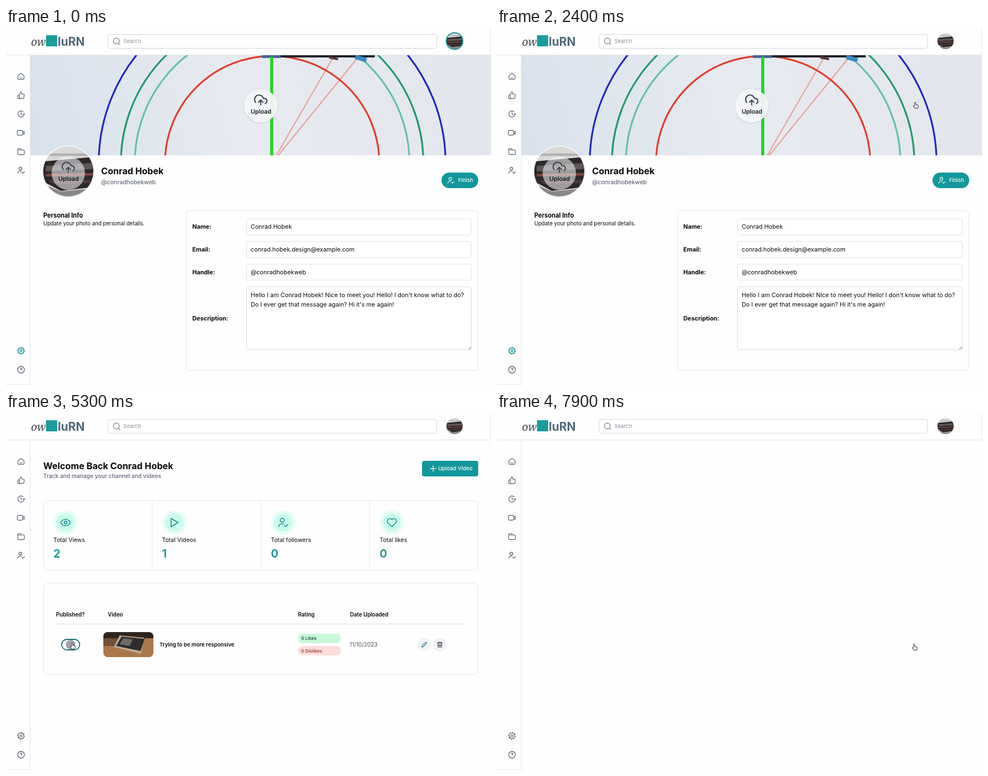
Animation, 872 px wide and 642 px high, one loop 8000 ms. Source, as an HTML page with a canvas:

```html
<!DOCTYPE html>
<html lang="en">
<head>
<meta charset="utf-8">
<title>Channel settings</title>
<style>
html, body { margin: 0; width: 100%; height: 100%; overflow: hidden; background: #fefefe; }
canvas { display: block; width: 872px; height: 642px; }
</style>
</head>
<body>
<canvas id="stage" width="872" height="642"></canvas>
<script>
const ctx = document.getElementById('stage').getContext('2d');
const LOOP = 8000;
const TEAL = '#12979a', INK = '#08090b', GREY = '#4b5563', LINE = '#e4e6ea';
const NAME = 'Conrad Hobek', HANDLE = '@conradhobekweb';

function gearPath() {
  let d = '';
  for (let i = 0; i < 32; i++) {
    const r = i % 4 < 2 ? 10.5 : 8, a = (i + .5) * Math.PI / 16;
    d += (i ? 'L' : 'M') + (12 + r * Math.cos(a)) + ' ' + (12 + r * Math.sin(a));
  }
  return d + 'ZM15 12a3 3 0 1 1-6 0 3 3 0 0 1 6 0Z';
}

// Icons live in a 24 x 24 box.
const ICONS = {
  home: 'M3 10.5 10 4a3 3 0 0 1 4 0l7 6.5V18a3 3 0 0 1-3 3H6a3 3 0 0 1-3-3ZM8 17h8',
  like: 'M14 9V5a3 3 0 0 0-3-3l-4 9v11h11.3a2 2 0 0 0 2-1.7l1.4-9a2 2 0 0 0-2-2.3ZM7 22H4a2 2 0 0 1-2-2v-7a2 2 0 0 1 2-2h3',
  clock: 'M23 13l-2-2-2 2M21 12a9.2 9.2 0 1 1-2.7-6.4M12 7v5l3.5 2',
  video: 'M22 8.5c0-.9-.9-1.3-1.6-.7L17 11v2l3.4 3.2c.7.6 1.6.2 1.6-.7ZM4 5h10a3 3 0 0 1 3 3v8a3 3 0 0 1-3 3H4a3 3 0 0 1-3-3V8a3 3 0 0 1 3-3Z',
  folder: 'M13 7l-1.1-2.2A3 3 0 0 0 9.2 3H5a3 3 0 0 0-3 3v1h17a3 3 0 0 1 3 3v7a4 4 0 0 1-4 4H6a4 4 0 0 1-4-4V7',
  follow: 'M14.5 7a4.3 4.3 0 1 1-8.6 0 4.3 4.3 0 0 1 8.6 0ZM13 15H8a5.5 5.5 0 0 0-5.5 6M14.5 18l2.7 2.7L22.5 16',
  gear: gearPath(),
  help: 'M22 12a10 10 0 1 1-20 0 10 10 0 0 1 20 0ZM9.1 9a3 3 0 0 1 5.8 1c0 2-3 3-3 3M12 17h.01',
  search: 'M20 11a9 9 0 1 1-18 0 9 9 0 0 1 18 0ZM17.5 17.5l4.5 4.5',
  upload: 'M16 16l-4-4-4 4M12 12v9M20.4 18.4A5 5 0 0 0 18 9h-1.3A8 8 0 1 0 3 16.3',
  user: 'M16.5 7.5a4.5 4.5 0 1 1-9 0 4.5 4.5 0 0 1 9 0ZM4 22c0-5 3-7 8-7s8 2 8 7',
  brush: 'M9 12 18.5 2.8a1.8 1.8 0 0 1 2.7 2.7L12 15M9 12a5 5 0 0 0-5 5c0 2-1 3-2 4 5 1 10 0 10-6Z',
  chat: 'M3 6a3 3 0 0 1 3-3h12a3 3 0 0 1 3 3v9a3 3 0 0 1-3 3h-3l-4 4v-4H6a3 3 0 0 1-3-3ZM12 7v7M8.5 10.5h7',
  file: 'M14 2H7a3 3 0 0 0-3 3v14a3 3 0 0 0 3 3h10a3 3 0 0 0 3-3V8ZM14 2v6h6M8 13h8M8 17h6',
  lock: 'M17 10V8A5 5 0 0 0 7 8v2M6 10h12a2 2 0 0 1 2 2v7a2 2 0 0 1-2 2H6a2 2 0 0 1-2-2v-7a2 2 0 0 1 2-2ZM12 14v3',
  exit: 'M9 3H6a3 3 0 0 0-3 3v12a3 3 0 0 0 3 3h3M16 8l5 4-5 4M21 12H9',
  eye: 'M1.5 12C4 7 8 5 12 5s8 2 10.5 7C20 17 16 19 12 19S4 17 1.5 12ZM15 12a3 3 0 1 1-6 0 3 3 0 0 1 6 0Z',
  play: 'M5 3l15 9-15 9Z',
  heart: 'M12 21 3.5 12.5a5.5 5.5 0 0 1 8-7.5l.5.6.5-.6a5.5 5.5 0 0 1 8 7.5Z',
  pencil: 'M3 21l1-5L16.5 3.5a2.5 2.5 0 0 1 4 4L8 20Z',
  trash: 'M3 6h18M8 6V3h8v3M5 6l1 15h12l1-15M10 11v6M14 11v6',
  plus: 'M12 2v20M2 12h20'
};
for (const k in ICONS) ICONS[k] = new Path2D(ICONS[k]);
const HAND = new Path2D('M5 9V2.5a1.5 1.5 0 0 1 3 0V7l4.5 1A2 2 0 0 1 14 10v2l-1.5 4h-6L2.5 11.5c-.8-1 .5-2.5 1.7-1.5Z');
const ARROW = new Path2D('M0 0V10.5L2.6 8.2 4.4 12 6.2 11.2 4.5 7.5H8Z');

function icon(name, x, y, size, color, weight = 1.1) {
  const k = size / 24;
  ctx.save();
  ctx.translate(x - size / 2, y - size / 2);
  ctx.scale(k, k);
  ctx.strokeStyle = color;
  ctx.lineWidth = weight / k;
  ctx.lineCap = ctx.lineJoin = 'round';
  ctx.stroke(ICONS[name]);
  ctx.restore();
}

// Text placed by the middle of its capitals.
function text(s, x, mid, size, weight = 400, color = INK, family = 'Inter, sans-serif') {
  ctx.font = `${weight} ${size}px ${family}`;
  ctx.fillStyle = color;
  ctx.fillText(s, x, mid + size * .364);
}

function box(x, y, w, h, r, fill, stroke, weight = 1) {
  ctx.beginPath();
  ctx.roundRect(x, y, w, h, r);
  if (fill) { ctx.fillStyle = fill; ctx.fill(); }
  if (stroke) { ctx.strokeStyle = stroke; ctx.lineWidth = weight; ctx.stroke(); }
}

function disc(x, y, r, fill, stroke, weight = 1) {
  box(x - r, y - r, 2 * r, 2 * r, r, fill, stroke, weight);
}

function line(x1, y1, x2, y2, color = LINE, weight = 1) {
  ctx.beginPath();
  ctx.moveTo(x1, y1);
  ctx.lineTo(x2, y2);
  ctx.strokeStyle = color;
  ctx.lineWidth = weight;
  ctx.stroke();
}

function rect(x, y, w, h, color) {
  ctx.fillStyle = color;
  ctx.fillRect(x, y, w, h);
}

function poly(color, ...p) {
  ctx.beginPath();
  for (let i = 0; i < p.length; i += 2) ctx.lineTo(p[i], p[i + 1]);
  ctx.closePath();
  ctx.fillStyle = color;
  ctx.fill();
}

function shadow(color, blur, dy, draw) {
  ctx.save();
  ctx.shadowColor = color;
  ctx.shadowBlur = blur;
  ctx.shadowOffsetY = dy;
  draw();
  ctx.restore();
}

function portrait(x, y, r) {
  ctx.save();
  disc(x, y, r, '#d9d8d8');
  ctx.clip();
  ctx.translate(x, y);
  ctx.scale(r, r);
  rect(-1, -.72, 2, .1, '#b5b1b0');
  poly('#2c282a', -1, -.4, 1, -.58, 1, .62, -.3, .78, -1, .4);
  poly('#5f5756', -.9, -.22, 1, -.34, 1, -.1, -.9, 0);
  poly('#85453f', -.9, .1, 1, .06, 1, .16, -.9, .2);
  poly('#4e3a39', -.8, .36, 1, .34, 1, .46, -.6, .5);
  poly('#8b8788', -1, .5, -.3, .8, 1, .68, 1, 1, -1, 1);
  ctx.restore();
}

function frame(settings, ring) {
  line(0, 48.5, 872, 48.5);
  line(43.5, 49, 43.5, 642);
  line(0, 641.5, 43, 641.5);
  line(871.5, 0, 871.5, 48);
  text('ow', 45, 25, 19, 'italic 400', '#3f4649', '"Noto Serif", serif');
  rect(72, 13, 20, 20, '#1b9c9f');
  text('luRN', 93, 24, 21, 700, '#50697a');
  box(183.5, 11.5, 591, 25, 4, '#fff', '#d3d6db');
  icon('search', 199, 24, 14, '#6b7280');
  text('Search', 211, 24, 9.6, 400, '#8b919b');
  portrait(806.5, 23.5, 14.5);
  if (ring) disc(806.5, 23.5, 15, null, '#169c9c', 1.8);
  ['home', 'like', 'clock', 'video', 'folder', 'follow'].forEach((n, i) =>
    icon(n, 27, 87 + i * 33.8, 14.5, GREY));
  icon('gear', 27, 580.5, 14, settings ? TEAL : GREY, settings ? 1.4 : 1.1);
  icon('help', 27, 614.5, 14.5, GREY, 1.2);
}

function banner() {
  ctx.save();
  ctx.beginPath();
  ctx.rect(44, 49, 828, 180);
  ctx.clip();
  const g = ctx.createLinearGradient(44, 229, 872, 49);
  g.addColorStop(0, '#d9e2ec');
  g.addColorStop(.45, '#e7eaf0');
  g.addColorStop(1, '#e3e7ed');
  rect(44, 49, 828, 180, g);
  line(486, 229, 588, 53, '#e7a19b', 2.2);
  line(489.5, 229, 632, 54, '#e7a19b', 2.2);
  for (const [r, c] of [[311.8, '#2127c2'], [272, '#229b6d'], [247, '#62c2a6'], [192.7, '#e23d2a']]) {
    ctx.beginPath();
    ctx.arc(478.5, 243, r, Math.PI, 2 * Math.PI);
    ctx.strokeStyle = c;
    ctx.lineWidth = 3.2;
    ctx.stroke();
  }
  rect(490, 49, 173, 4, '#20222a');
  rect(460, 49, 34, 5, '#46679d');
  rect(475, 52, 5.5, 177, '#20d61f');
  line(581, 53, 597, 56, '#5b3436', 4);
  line(628, 52, 648, 58, '#358cbf', 8);
  ctx.restore();
}

function uploadDisc(x, y, fill) {
  disc(x, y, 30, fill);
  icon('upload', x, y - 10.5, 24, '#374151', 1.8);
  text('Upload', x - 18, y + 10.5, 10.8, 500);
}

function field(label, value, y) {
  text(label, 335, y, 10.8, 700);
  box(432.5, y - 14.5, 404, 29, 3, '#fff', '#dcdfe3');
  text(value, 440, y, 10.8);
}

function settingsPage() {
  banner();
  shadow('rgba(60,70,80,.18)', 3, 1, () => uploadDisc(458, 140, 'rgba(248,249,251,.92)'));
  disc(112, 258, 46.5, '#fff', '#eceef0');
  portrait(112, 258, 45);
  uploadDisc(112, 261, 'rgba(249,250,251,.55)');
  text(NAME, 171, 257.5, 16.1, 700);
  text(HANDLE, 171, 277, 10.7, 400, GREY);
  box(783, 260, 66, 28, 14, TEAL);
  icon('follow', 800, 274, 14, '#fff');
  text('Finish', 813, 274, 9.4, 500, '#fff');
  text('Personal Info', 67, 336.5, 11.1, 700);
  text('Update your photo and personal details.', 67, 351.5, 9.65);
  box(324.5, 328.5, 524, 287, 5, null, LINE);
  field('Name:', NAME, 357.5);
  field('Email:', 'conrad.hobek.design@example.com', 398.5);
  field('Handle:', HANDLE, 439);
  text('Description:', 335, 522.5, 10.8, 700);
  box(432.5, 465.5, 404, 113, 3, '#fff', '#d9dce0');
  text(`Hello I am ${NAME}! Nice to meet you! Hello! I don't know what to do?`, 440, 480, 10.8);
  text("Do I ever get that message again? Hi it's me again!", 440, 497, 10.8);
  line(831, 578, 836, 573, '#777');
  line(834, 578, 836, 576, '#777');
}

function menu(hoverY) {
  shadow('rgba(40,60,90,.2)', 6, 2, () => box(685.5, 43.5, 135, 256, 4, '#fff', '#cfd6df'));
  portrait(711, 69, 14.5);
  text(NAME, 730, 62, 9.6, 600, '#2a3442');
  text('conrad.hobek....', 730, 76, 9.5, 400, GREY);
  const items = [['user', 'View Profile', 105], ['brush', 'Creator Studio', 130.5], ['help', 'Help', 156],
    ['gear', 'Settings', 181], ['chat', 'Feedback', 206.5], ['file', 'Terms of Service', 232.5],
    ['lock', 'Privacy', 258], ['exit', 'Log Out', 284]];
  for (const [name, label, y] of items) {
    if (Math.abs(hoverY - y) <= 12.7) rect(686, y - 13, 134, 25.5, '#f2f3f6');
    icon(name, 702, y, 11.5, GREY);
    text(label, 713, y, 9.5, 400, '#374151');
  }
  for (const y of [91.5, 219.5, 270.5]) line(686, y, 820, y);
}

function thumbnail() {
  ctx.save();
  box(175, 394, 90, 45, 8, '#a9774c');
  ctx.clip();
  rect(175, 394, 90, 11, '#30251f');
  rect(175, 405, 28, 14, '#725039');
  poly('#bfa98c', 204, 400, 248, 404, 243, 433, 194, 421);
  poly('#2e2c2d', 208, 402, 249, 406, 242, 428, 198, 419);
  poly('#6e6a68', 211, 405, 228, 407, 222, 419, 204, 416);
  ctx.restore();
}

function toggle(on, focus) {
  if (focus) box(100, 407, 32.5, 19, 9.5, '#fff', '#236e74', 1.8);
  else box(101.5, 408.5, 30, 16, 8, '#fff', '#d8dce0');
  disc(110 + 12.5 * on, 416.5, 8.7, on > .5 ? '#23797b' : '#9ca3af');
}

function dashboard(on, focus) {
  text(`Welcome Back ${NAME}`, 67, 95.5, 16.2, 700);
  text('Track and manage your channel and videos', 67, 113.5, 10.2, 500, '#5d6571');
  box(748, 86, 101, 28, 4, TEAL);
  icon('plus', 768, 100, 12, '#fff', 1.3);
  text('Upload Video', 777, 100, 9.6, 500, '#fff');
  box(67.5, 157.5, 781, 125, 8, null, LINE);
  const stats = [['eye', 'Total Views', '2'], ['play', 'Total Videos', '1'],
    ['follow', 'Total followers', '0'], ['heart', 'Total likes', '0']];
  stats.forEach(([name, label, n], i) => {
    const x = 85 + 195.6 * i, edge = 67.5 + 195.4 * i;
    if (i) line(edge, 158, edge, 282);
    disc(x + 22, 197, 22, '#e9fdf6');
    disc(x + 22, 197, 16.5, '#c9fbec');
    icon(name, x + 22, 197, 20, '#128b8f', 1.5);
    text(label, x, 228.5, 10.5);
    text(n, x, 253, 20.5, 600, '#128f93');
  });
  box(67.5, 306, 781, 164.5, 8, null, LINE);
  for (const [s, x] of [['Published?', 90], ['Video', 183], ['Rating', 525], ['Date Uploaded', 618.5]])
    text(s, x, 362, 9.7, 600);
  line(90, 379.5, 827, 379.5, '#dcdfe3');
  toggle(on, focus);
  thumbnail();
  text('Trying to be more responsive', 276, 416.5, 9.55, 600);
  box(525, 397, 77, 17, 8, '#c7f8d8');
  text('0 Likes', 530.5, 405.5, 8.2, 600, '#245c49');
  box(525, 419, 77, 17, 8, '#fcdede');
  text('0 Dislikes', 530.5, 428, 8.2, 600, '#a34b28');
  text('11/10/2023', 618, 416.5, 9.9, 400, '#4a4f58');
  for (const x of [752, 780]) disc(x, 416.5, 11.2, '#f3f4f6', '#e3e6e9');
  icon('pencil', 752, 416.5, 11.5, '#177a76', 1.2);
  icon('trash', 780, 416.5, 12, '#30363f', 1.2);
}

// Pointer path: time, x, y.
const PATH = [[300, 806, 32], [800, 790, 70], [1300, 742, 173], [1500, 742, 173], [1800, 753, 139],
  [3300, 753, 139], [3500, 530, 191], [4100, 190, 424], [4300, 180, 426], [4500, 120, 419],
  [5900, 120, 419], [6200, 161, 419], [6800, 470, 420], [7600, 751, 421]];

function pointerAt(t) {
  const i = PATH.findIndex(p => p[0] > t);
  if (i === 0) return PATH[0].slice(1);
  if (i < 0) return PATH[PATH.length - 1].slice(1);
  const a = PATH[i - 1], b = PATH[i], k = (t - a[0]) / (b[0] - a[0]);
  return [a[1] + (b[1] - a[1]) * k, a[2] + (b[2] - a[2]) * k];
}

function pointer(t) {
  if (t < 300) return;
  const [x, y] = pointerAt(t);
  const hand = t < 2800 || (t >= 4500 && t < 6100) || t >= 7600;
  ctx.save();
  ctx.translate(x, y);
  ctx.lineJoin = 'round';
  if (hand) {
    ctx.scale(.74, .74);
    ctx.translate(-8, -8.5);
    ctx.fillStyle = '#fff';
    ctx.strokeStyle = '#3a3d42';
    ctx.lineWidth = 1.4;
    ctx.fill(HAND);
    ctx.stroke(HAND);
  } else {
    ctx.translate(-2.5, -5.5);
    ctx.scale(.85, .85);
    ctx.strokeStyle = '#fff';
    ctx.lineWidth = 2;
    ctx.stroke(ARROW);
    ctx.fillStyle = '#17181a';
    ctx.fill(ARROW);
  }
  ctx.restore();
}

function draw(t) {
  rect(0, 0, 872, 642, '#fefefe');
  frame(t < 2500, t < 600);
  if (t < 2500) {
    settingsPage();
    if (t >= 300 && t < 2000) menu(pointerAt(t - 100)[1]);
  } else if (t >= 2800 && t < 7600) {
    const on = t < 4800 || t >= 5400 ? 1 : t === 4800 || t === 5300 ? .5 : 0;
    dashboard(on, t >= 4800 && t < 7300);
  } else {
    disc(458, 316.5, .7, '#c4c8cc');
  }
  pointer(t);
}

const start = performance.now();
function tick() {
  const t = (performance.now() - start) % LOOP;
  draw(Math.floor(t / 100) * 100);
  requestAnimationFrame(tick);
}
tick();
</script>
</body>
</html>
```
